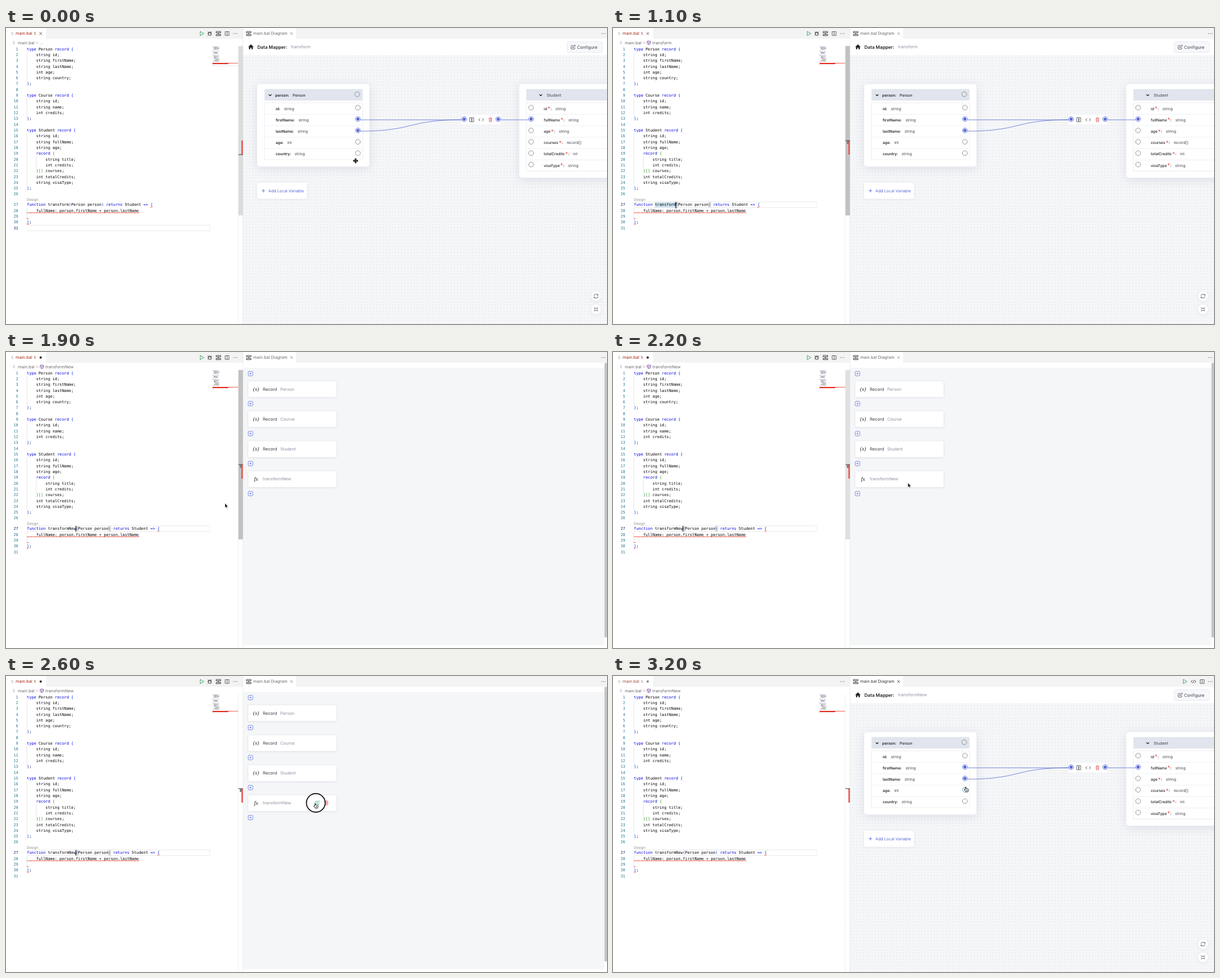
Recreate the animation shown at these times as an HTML page with a canvas. Size 1065x526 px, loop 3.3 s.

```html
<!DOCTYPE html>
<html lang="en">
<head>
<meta charset="utf-8">
<title>Data Mapper</title>
<style>
html, body { margin: 0; width: 100%; height: 100%; overflow: hidden; background: #fff; }
canvas { display: block; width: 1065px; height: 526px; }
</style>
</head>
<body>
<canvas id="stage"></canvas>
<script>
const W = 1065, H = 526, LOOP = 3300, STEP = 100;
const UI = 'Inter, sans-serif', MONO = '"DejaVu Sans Mono", monospace';
const BLUE = '#5567d5', INK = '#40404b', MUTED = '#8d91a3', RED = '#e51400', KEY = '#0000e0';
const CH = 4.13, LEFT = 37;
const canvas = document.getElementById('stage');
const c = canvas.getContext('2d');
const dpr = window.devicePixelRatio || 1;
canvas.width = W * dpr;
canvas.height = H * dpr;
c.textRendering = 'geometricPrecision';

// ---- drawing helpers ----
function rect(x, y, w, h, fill) {
  c.fillStyle = fill;
  c.fillRect(x, y, w, h);
}
function box(x, y, w, h, r, fill, stroke, lw = 0.6) {
  c.beginPath();
  c.roundRect(x, y, w, h, r);
  if (fill) { c.fillStyle = fill; c.fill(); }
  if (stroke) { c.strokeStyle = stroke; c.lineWidth = lw; c.stroke(); }
}
function shadowBox(x, y, w, h, r, blur, alpha) {
  c.save();
  c.shadowColor = `rgba(90,100,140,${alpha})`;
  c.shadowBlur = blur * dpr;
  c.shadowOffsetY = blur / 6 * dpr;
  box(x, y, w, h, r, '#fff');
  c.restore();
}
function text(s, x, y, size, color, weight = 400, font = UI) {
  c.font = `${weight} ${size}px ${font}`;
  c.fillStyle = color;
  c.fillText(s, x, y);
  return x + c.measureText(s).width;
}
// Path given relative to (x, y)
function path(d, x, y, stroke, lw = 0.8, fill) {
  const p = new Path2D(d);
  c.save();
  c.translate(x, y);
  c.lineJoin = 'round';
  if (fill) { c.fillStyle = fill; c.fill(p); }
  if (stroke) { c.strokeStyle = stroke; c.lineWidth = lw; c.stroke(p); }
  c.restore();
}
function disc(x, y, r, fill, stroke, lw = 1) {
  c.beginPath();
  c.arc(x, y, r, 0, 7);
  if (fill) { c.fillStyle = fill; c.fill(); }
  if (stroke) { c.strokeStyle = stroke; c.lineWidth = lw; c.stroke(); }
}

// ---- icons ----
const cross = (x, y, col) => path('M-2.3-2.3L2.3 2.3M2.3-2.3L-2.3 2.3', x, y, col, 0.8);
const dots = (x, y) => [-3, 0, 3].forEach(d => disc(x + d, y, 0.65, '#424242'));
const play = (x, y) => path('M-2.8-3.8L3.6 0L-2.8 3.8Z', x, y, '#2f9e5b', 0.9);
const split = (x, y) => path('M-3.5-3.3H3.5V3.3H-3.5ZM0-3.3V3.3', x, y, '#424242', 0.8);
const angles = (x, y, col) => path('M-1.8-2.5L-4.4 0L-1.8 2.5M1.8-2.5L4.4 0L1.8 2.5', x, y, col, 0.9);
const fileIcon = (x, y) => path('M-1.5-2H2M-2 0H1.2M-1.5 2H2', x, y, '#9aa5ab', 0.7);
const flow = (x, y) => path('M-4-3.6H4.2V-1.2H-4ZM-4 1.6H4.2V3.8H-4ZM0-1.2V1.6', x, y, '#333', 0.95);
const bug = (x, y) => path('M-2.3-.6A2.3 2.3 0 0 1 2.3-.6V1A2.3 2.6 0 0 1-2.3 1ZM-2.3-1H2.3M-3.6-3L-2-1.8M3.6-3L2-1.8M-3.8.4H-2.3M2.3.4H3.8M-3.4 3.3L-2 2M3.4 3.3L2 2', x, y, '#333', 0.9);
const trash = (x, y) => path('M-3-2.4H3M-1-2.4V-3.6H1V-2.4M-2.3-2.4L-2 3.6H2L2.3-2.4M-.7-1V2.2M.7-1V2.2', x, y, '#e05252', 0.75);
const edit = (x, y, col) => path('M0-3H-2A1.5 1.5 0 0 0-3.6-1.5V2A1.5 1.5 0 0 0-2 3.6H1.6A1.5 1.5 0 0 0 3 2V.5M-1.2 1.2L-.8-.6L3-4.2L4.2-3L.5.8Z', x, y, col, 0.8);
const chevron = (x, y) => path('M-2.4-1.2L0 1.3L2.4-1.2', x, y, '#222', 1.1);

// ---- code editor ----
const codeLines = name => `type Person record {
    string id;
    string firstName;
    string lastName;
    int age;
    string country;
};

type Course record {
    string id;
    string name;
    int credits;
};

type Student record {
    string id;
    string fullName;
    string age;
    record {
        string title;
        int credits;
    }[] courses;
    int totalCredits;
    string visaType;
};

function ${name}(Person person) returns Student => {
    fullName: person.firstName + person.lastName

};
`.split('\n');
const lineY = n => 37.2 + (n - 1) * 10.315 + (n > 26 ? 8.6 : 0);

function squiggle(x0, x1, y) {
  c.beginPath();
  for (let x = x0, i = 0; x <= x1; x += 1.15, i++) c.lineTo(x, y + (i % 2 ? 0.6 : -0.6));
  c.strokeStyle = RED;
  c.lineWidth = 0.75;
  c.stroke();
}

function drawCode(s) {
  const lines = codeLines(s.name);
  const ay = lineY(s.row);
  rect(LEFT, ay - 5.4, 325, 0.8, '#e2e2e2');
  rect(LEFT, ay + 4.7, 325, 0.8, '#e2e2e2');
  rect(361.4, ay - 5.4, 0.6, 10.5, '#e8e8e8');

  [[2, 6, 0], [10, 12, 0], [16, 24, 0], [20, 21, 4], [28, 29, 0]].forEach(([a, b, col]) =>
    rect(LEFT + col * CH - 0.3, lineY(a) - 5, 0.6, lineY(b) - lineY(a) + 10.3, '#d3d3d3'));

  const open = 9 + s.name.length, y27 = lineY(27);
  if (s.word) rect(LEFT + 9 * CH, y27 - 4.7, s.name.length * CH, 9.6, '#cfe3ee');
  if (s.focus) [open, open + 14].forEach(i =>
    box(LEFT + i * CH, y27 - 4.6, CH, 9.2, 0, '#e6ece6', '#b9b9b9', 0.5));

  let depth = 0;
  lines.forEach((line, i) => {
    const n = i + 1, base = lineY(n) + 2.4;
    for (const m of line.matchAll(/=>|\w+|[^\s\w]/g)) {
      const k = m[0];
      let color = '#000';
      if (/^(type|record|function|returns|=>)$/.test(k)) color = KEY;
      if ('}])'.includes(k)) depth--;
      if ('{[()]}'.includes(k)) color = depth ? '#319331' : '#0431fa';
      if ('{[('.includes(k)) depth++;
      text(k, LEFT + m.index * CH, base, 6.86, color, 400, MONO);
    }
    text(n, 21.7 - CH * String(n).length, base, 6.86, n === s.row ? '#0b216f' : '#237893', 400, MONO);
  });
  text('Design', LEFT, 306.7, 6.2, '#8a8a8a');

  const brace = LEFT + (lines[26].length - 1) * CH;
  squiggle(brace, brace + 4, 318.3);
  squiggle(LEFT, 236, 328.4);
  squiggle(LEFT, 41, 338.6);
  squiggle(LEFT, 41, 348.8);
  if (s.focus) rect(LEFT + open * CH - 0.5, y27 - 4.8, 1.1, 9.8, '#000');

  // Minimap
  lines.forEach((line, i) => {
    for (const m of line.matchAll(/\S+/g))
      rect(366 + m.index * 0.58, 32.8 + i * 1.13, m[0].length * 0.58, 0.75,
        /type|record|function|returns/.test(m[0]) ? 'rgba(0,0,200,.5)' : 'rgba(0,0,0,.42)');
  });
  rect(366, 62, 45.5, 0.9, '#f04a3c');
  rect(366, 62.6, 28, 1.5, RED);
  if (s.row === 31) rect(366, 67, 45.5, 0.6, '#ddd');

  // Scrollbar and overview marks
  rect(411.4, 32, 0.6, 494, '#e4e4e4');
  if (s.bar) rect(412, 32, 8, 301, s.bar);
  rect(417.2, 200, 2.8, 25, '#e8524a');
  if (s.focus) rect(414.4, 201, 2.8, 5, '#777');
  rect(412, s.row === 31 ? 224.6 : 199.6, 8, 1, '#333');
}

function drawFrame(s) {
  rect(0, 0, W, H, '#fff');
  rect(0, 0, W, 19, '#f3f3f3');
  rect(0, 0, 71, 19, '#fff');
  rect(420, 0, 94, 19, '#fff');

  const tabColor = s.active ? '#b5655a' : '#a1260d';
  fileIcon(11, 9.8);
  text('main.bal', 17, 12.3, 7.4, s.active ? '#a6483c' : tabColor);
  text('5', 49.5, 12.2, 6.4, tabColor);
  if (s.dirty) disc(61.5, 9.8, 2.1, s.active ? '#888' : '#333');
  else cross(61.5, 9.8, '#333');

  if (!s.active) {
    play(347, 9.8);
    bug(361, 9.8);
    flow(376.3, 9.8);
    split(391.8, 9.8);
  }
  dots(406.3, 9.8);

  fileIcon(14, 26);
  let x = text('main.bal', 21, 28.7, 7.4, '#6a6a6a');
  path('M-1-2L1 0L-1 2', x + 4.4, 26.2, '#777', 0.7);
  if (s.crumb) {
    path('M0-3.4L3-1.8V1.8L0 3.4L-3 1.8V-1.8ZM-3-1.8L0-.2L3-1.8M0-.2V3.4', 63.5, 26, '#652d90', 0.75);
    text(s.crumb, 70, 28.7, 7.4, '#6a6a6a');
  } else text('...', 59, 28.7, 7.4, '#6a6a6a');

  flow(430, 9.8);
  text('main.bal Diagram', 438, 12.3, 7.4, s.active ? '#333' : '#6a6a6a');
  cross(506, 9.8, s.active ? '#333' : '#8a8a8a');
  if (s.active) {
    play(1013.5, 9.8);
    angles(1028.7, 9.8, '#333');
    path('M-.8 2.6L.8-2.6', 1028.7, 9.8, '#333', 0.8);
    split(1044, 9.8);
  }
  dots(1058.5, 9.8);
}

// ---- data mapper ----
const dotTile = (() => {
  const t = document.createElement('canvas');
  t.width = t.height = 20;
  const g = t.getContext('2d');
  g.fillStyle = '#f5f6f8';
  g.fillRect(0, 0, 20, 20);
  g.fillStyle = '#dfe2e8';
  g.arc(10, 10, 2.6, 0, 7);
  g.fill();
  const p = c.createPattern(t, 'repeat');
  p.setTransform(new DOMMatrix().scale(0.275));
  return p;
})();

function port(x, y, on, hover) {
  disc(x, y, 4.3, '#fff', on ? BLUE : hover ? '#4da3e0' : '#82868f', 0.9);
  if (on) disc(x, y, 2.7, BLUE);
}

function fields(x, rows, required, hover) {
  const px = required ? 930.5 : 623.6, nx = required ? 953 : 478;
  box(x, 133, 174, rows.length * 20.2, 0, '#fff', '#dfe1e8');
  rows.forEach(([name, type, on], i) => {
    const y = 143.3 + i * 20.2, base = y + 2.3;
    if (i) rect(x, y - 10.2, 174, 0.6, '#e4e6ec');
    let end;
    if (required) {
      end = text(name, nx, base, 6.7, '#222228', 500);
      end = text('*', end + 1, base + 0.6, 9, '#f0403a', 500);
      end = text(':', end + 0.5, base, 6.6, '#222228', 600) + 6.5;
    } else end = text(name + ':', nx, base, 6.6, '#222228', 600) + 6.5;
    text(type, end, base, 6.8, INK);
    port(px, y - 1.7, on, hover === name);
  });
}

function drawMapper(s) {
  rect(420, 48, 645, 478, dotTile);
  path('M-4.8.3L0-4.4L4.8.3H3.4V4.2H1V1.4H-1V4.2H-3.4V.3Z', 434, 33.5, null, 0, '#222');
  text('Data Mapper:', 445.5, 36.5, 8.1, '#222228', 600);
  text(s.name, 505, 36.4, 7.6, MUTED);
  box(994.5, 24.5, 62.5, 19, 2.5, '#f7f8fb', '#dcdfe7');
  edit(1005, 34, INK);
  text('Configure', 1012, 36.8, 7.7, INK);

  shadowBox(445, 99.7, 199, 146.5, 5, 18, 0.16);
  box(458, 108.5, 174, 20.5, 1, '#e1e5ee');
  chevron(468, 119.2);
  text('person:', 477, 122, 6.75, '#222228', 600);
  text('Person', 508, 122, 6.7, '#222228', 500);
  disc(622.5, 117.7, 4.3, null, '#82868f', 0.9);
  fields(458, [['id', 'string'], ['firstName', 'string', 1], ['lastName', 'string', 1],
    ['age', 'int'], ['country', 'string']], false, s.hover);

  shadowBox(909.5, 99.7, 200, 166.5, 5, 18, 0.16);
  box(922, 108.5, 174, 20.5, 1, '#e1e5ee');
  chevron(947.6, 119.2);
  text('Student', 958, 122.2, 7.1, INK);
  fields(922, [['id', 'string'], ['fullName', 'string', 1], ['age', 'string'], ['courses', 'record[]'],
    ['totalCredits', 'int'], ['visaType', 'string']], true);

  path('M628 163.2H808M628 183.3C725 183 710 163.2 808 163.2M876 163.2H926', 0, 0, BLUE, 0.8);
  box(807, 154.5, 70, 17, 3, '#fff');
  port(811.8, 162, true);
  path('M-3.6-3.6H3.6V3.6H-3.6ZM-1.2-2H1.2M0-2V2M-1.2 2H1.2M-1.2 0H1.2', 825.3, 163, INK, 0.8);
  angles(842, 163, INK);
  trash(858.5, 163);
  port(872.2, 162, true);

  shadowBox(445, 275, 88, 28.5, 3, 5, 0.1);
  path('M-3 0H3M0-3V3', 456.2, 289.2, BLUE, 0.9);
  text('Add Local Variable', 465, 291.8, 7.1, BLUE);

  shadowBox(1036.7, 467.7, 17.6, 17.6, 9, 5, 0.14);
  path('M-3.7-.5A3.8 3.8 0 0 1 3.2-2M3.7-3.6V-1.5H1.6M3.7.5A3.8 3.8 0 0 1-3.2 2M-3.7 3.6V1.5H-1.6', 1045.5, 476.5, INK, 0.8);
  shadowBox(1036.7, 491.2, 17.6, 17.6, 9, 5, 0.14);
  path('M-3.6-3.6L-1.2-1.2M-1.2-3V-1.2H-3M3.6-3.6L1.2-1.2M1.2-3V-1.2H3M-3.6 3.6L-1.2 1.2M-1.2 3V1.2H-3M3.6 3.6L1.2 1.2M1.2 3V1.2H3', 1045.5, 500, INK, 0.7);
}

// ---- module overview ----
function drawOverview(s) {
  rect(420, 28, 640.5, 493, '#f5f6f8');
  rect(1060.5, 19.5, 4.5, 487.5, '#c4c4c4');
  for (let i = 0; i < 5; i++) {
    const y = 38.4 + i * 53.3;
    box(429.2, y - 4, 8.2, 8, 1.8, '#fff', BLUE, 0.8);
    path('M-2 0H2M0-2V2', 433.3, y, BLUE, 0.8);
  }
  ['Person', 'Course', 'Student', s.name].forEach((name, i) => {
    const y = 66 + i * 53.3, fn = i === 3;
    shadowBox(429.3, y - 14, 156.5, 28.3, 2, 3, 0.22);
    text(fn ? 'fx' : '(x)', fn ? 439.5 : 437.8, y + 2.7, fn ? 10 : 9.5, '#222', 'italic 500', '"Liberation Serif", serif');
    if (!fn) text('Record', 455, y + 2.5, 7.6, INK);
    text(name, fn ? 455 : 486, y + 2.5, 7.5, MUTED);
  });
  if (s.t >= 2300) {
    edit(551.5, 225.5, '#36a38e');
    trash(568, 225.5);
  }
  if (s.t >= 2500) disc(549, 225.5, 16.6, s.t < 2600 ? 'rgba(255,255,255,.55)' : null, '#111', 1.8);
}

// ---- pointer ----
const pointers = {
  move: (x, y) => path('M0-4.6L1.8-2.6H.7V-.7H2.6V-1.8L4.6 0L2.6 1.8V.7H.7V2.6H1.8L0 4.6L-1.8 2.6H-.7V.7H-2.6V1.8L-4.6 0L-2.6-1.8V-.7H-.7V-2.6H-1.8Z', x, y, '#111', 0.5, '#111'),
  beam: (x, y) => path('M-1.6-4.4Q0-4.4 0-3.4Q0-4.4 1.6-4.4M0-3.4V3.6M-1.6 4.6Q0 4.6 0 3.6Q0 4.6 1.6 4.6', x, y, '#222', 0.9),
  arrow: (x, y) => path('M-2-4.8V3.2L-.2 1.6L1.1 4.6L2.4 4L1.1 1.2H3.6Z', x, y, '#fff', 0.5, '#111'),
  hand: (x, y) => path('M-2.4.6V-3.6Q-1.6-4.8-.9-3.6V-1.2Q0-2 .6-1Q1.5-1.8 2-.7Q3.2-1.2 3.4 0V2Q3.2 3 2.6 4.4H-1.6Q-2.2 3-4.2.6Q-4-.8-2.4.6ZM-.2 1V2.8M1.3 1V2.8', x, y, '#111', 0.9, '#fff')
};
// start, end, from x, y, to x, y
const moves = [
  [0, 500, 619.5, 236, 111.5, 315.5],
  [1900, 2300, 390, 273.5, 549.5, 230.5],
  [2700, 3200, 549, 226.5, 626.5, 201.5]
];
function drawPointer(t) {
  if (t >= 1200 && t < 1900) return;
  const [a, b, x0, y0, x1, y1] = moves.findLast(m => t >= m[0]);
  const p = Math.min(1, (t - a) / (b - a)), e = p * p * (3 - 2 * p);
  const x = x0 + (x1 - x0) * e, y = y0 + (y1 - y0) * e;
  const kind = t < 1200 ? (x > 420 ? 'move' : 'beam')
    : t < 2300 ? 'arrow' : t < 2700 ? 'hand' : t < 3200 ? 'move' : 'hand';
  pointers[kind](x, y);
}

function render(t) {
  const active = t >= 2700;
  const typed = t < 1200 ? 0 : t < 1400 ? 1 : t < 1600 ? 2 : 3;
  const s = {
    t, active,
    name: 'transform' + 'New'.slice(0, typed),
    crumb: t < 700 ? '' : t < 1700 ? 'transform' : 'transformNew',
    row: t < 500 ? 31 : 27,
    focus: t >= 500 && !active,
    word: t >= 700 && t < 1200,
    dirty: t >= 1200,
    bar: t < 300 ? '#dcdcdc' : t < 2200 ? '#c1c1c1' : t < 2400 ? '#e0e0e0' : '',
    hover: t >= 3200 ? 'age' : ''
  };
  c.setTransform(dpr, 0, 0, dpr, 0, 0);
  drawFrame(s);
  drawCode(s);
  if (t >= 1200 && !active) drawOverview(s);
  else drawMapper(s);
  rect(419.7, 0, 0.6, H, '#e2e2e2');
  drawPointer(t);
}

let start;
function tick(now) {
  start ??= now;
  render(Math.floor((now - start) % LOOP / STEP) * STEP);
  requestAnimationFrame(tick);
}
requestAnimationFrame(tick);
</script>
</body>
</html>
```
